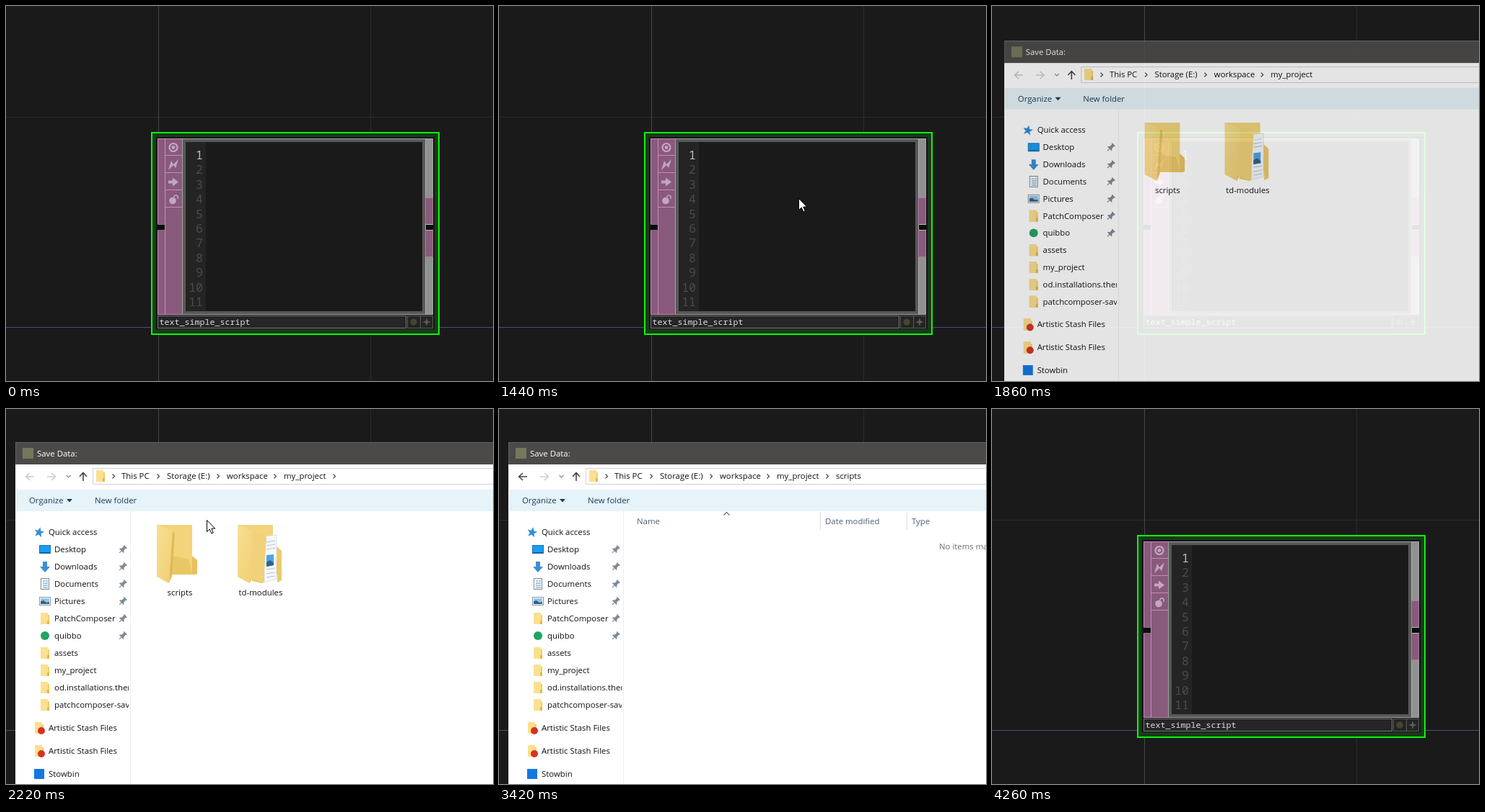
Recreate the animation shown at these times as an HTML page. Size 675 by 521 pixels, loop 5.28 s.

```html
<!DOCTYPE html>
<html lang="en">
<head>
<meta charset="utf-8">
<title>Save script</title>
<style>
html, body { margin: 0; width: 100%; height: 100%; overflow: hidden; background: #1a1a1a; }
svg { display: block; width: 675px; height: 521px; }
text { white-space: pre; }
.mono { font-family: "Noto Sans Mono", "DejaVu Sans Mono", monospace; }
.ui { font: 11.4px "Open Sans", "Noto Sans", sans-serif; fill: #111; }
.line { fill: none; stroke-width: 1; }
</style>
</head>
<body>
<svg id="stage" viewBox="0 0 675 521" xmlns="http://www.w3.org/2000/svg">
  <defs>
    <clipPath id="side"><rect x="13" y="142" width="157" height="400"/></clipPath>
    <linearGradient id="flap" x1="0" x2="1" y1="0" y2="1">
      <stop offset="0" stop-color="#f8df92"/><stop offset="1" stop-color="#f0cf74"/>
    </linearGradient>
    <g id="small">
      <path d="M-6-8H4V-5H6V8H-6Z" fill="#efcf6d"/>
      <path d="M-6-8H4V4L6 5V8H-6Z" fill="#fbe08f"/>
      <path d="M3 3H6V8H3Z" fill="#e2b84e"/>
    </g>
    <g id="pin" fill="#7d8a96" transform="rotate(45)">
      <path d="M-3-5.5H3V-4H2V0L4 2V3H-4V2L-2 0V-4H-3Z"/><path d="M-.6 3H.6V7H-.6Z"/>
    </g>
    <g id="big">
      <path d="M0 0H49V43L56 49V68L53 69H20Z" fill="#e6c25e"/>
      <path d="M0 0H49V68H24Z" fill="#f3d47b"/>
      <path d="M17 42L44 48L50 69H17Z" fill="#e9c765"/>
      <path d="M0 0L22 8L17 81L0 72Z" fill="url(#flap)"/>
      <path d="M22 8L17 81L21 71L25 12Z" fill="#dfba59"/>
    </g>
  </defs>

  <rect width="675" height="521" fill="#1a1a1a"/>
  <g class="line">
    <path d="M505.5 0V521M0 154.5H675" stroke="#2b2b2e"/>
    <path d="M211.5 0V521" stroke="#474747"/>
    <path d="M0 446.5H675" stroke="#4b4b82"/>
  </g>
  <g id="op"></g>
  <g id="menu"></g>
  <g id="dialog"></g>
  <path id="cursor" d="M.5.5V16.5L4.3 13L6.9 19L9.3 18L6.8 12.1H11.8Z" fill="#fff" stroke="#000" stroke-width="1"/>
</svg>
<script>
const LOOP = 5280, TICK = 60;
const $ = id => document.getElementById(id);
const rect = (x, y, w, h, fill, extra = "") =>
  `<rect x="${x}" y="${y}" width="${w}" height="${h}" fill="${fill}" ${extra}/>`;
const box = (x, y, w, h, fill, stroke) =>
  rect(x + .5, y + .5, w - 1, h - 1, fill, `stroke="${stroke}"`);
const path = (d, fill, extra = "") => `<path d="${d}" fill="${fill}" ${extra}/>`;
const stroke = (d, color, width = 1) =>
  path(d, "none", `stroke="${color}" stroke-width="${width}"`);
const label = (x, y, s, extra = "") => `<text class="ui" x="${x}" y="${y}" ${extra}>${s}</text>`;
const use = (id, x, y) => `<g transform="translate(${x} ${y})"><use href="#${id}"/></g>`;
const at = (x, y, body) => `<g transform="translate(${x} ${y})">${body}</g>`;

function operator() {
  const pink = "#cf86c0", plum = "#885a7c", icon = "#c6a5bf";
  let s = rect(202, 176, 398, 280, "#183a19", 'stroke="#0cf50c" stroke-width="2"');
  s += rect(208, 182, 386, 267, "#151515");
  s += box(210, 184, 11, 120, plum, pink) + box(210, 311, 11, 118, plum, pink);
  s += box(210, 303, 10, 9, "#111", "#777") + rect(210, 304, 10, 7, "#0c0c0c");
  s += box(220, 184, 25, 245, plum, pink);
  for (let y = 207; y < 290; y += 24) s += rect(221, y, 23, 1, pink);
  s += `<circle cx="232" cy="196.500" r="5.500" fill="none" stroke="${icon}" stroke-width="2.200"/>
    <circle cx="232" cy="196.500" r="2.400" fill="${icon}"/>`;
  s += path("M225 228L229 215L232 220L239 213L235 225L232 221Z", icon);
  s += path("M225 242.500H231V238.500L239 244.500L231 250.500V246.500H225Z", icon);
  s += `<circle cx="231" cy="270.500" r="4.800" fill="${icon}"/>`;
  s += stroke("M233 266V264.500Q235.500 261 238 264.500V268", icon, 1.6);
  s += box(244, 184, 338, 245, "#585858", "#a2a2a2");
  s += rect(249, 189, 328, 235, "#1a1a1a") + rect(249, 189, 28, 235, "#242424");
  for (let i = 0; i < 11; i++)
    s += `<text class="mono" x="273" y="${213 + i * 20.4}" text-anchor="end" font-size="16.500"
      fill="${i ? "#4b4b4b" : "#bdbdbd"}">${i + 1}</text>`;
  s += box(581, 184, 11, 245, "#919191", "#a8a8a8");
  s += box(581, 266, 11, 38, plum, "#b07aa4") + box(581, 311, 11, 38, plum, "#b07aa4");
  s += rect(582, 304, 10, 7, "#0c0c0c") + rect(582, 303, 10, 1, "#bbb") + rect(582, 311, 10, 1, "#bbb");
  s += box(210, 430, 345, 18, "#262628", "#777");
  s += box(556, 430, 19, 18, "#242424", "#5c5c5c") + box(574, 430, 18, 18, "#242424", "#5c5c5c");
  s += `<text class="mono" x="212.500" y="443" font-size="11.670" fill="#dedede">text_simple_script</text>
    <circle cx="565" cy="439" r="4.600" fill="#46462e"/>
    <path id="flag" fill="#5a5a5a"/>`;
  return s;
}

function menu() {
  const rows = ["Parameters...", "Info...", "Viewer Active", "View...", "Edit Contents...",
    "Run Script", "Save Contents...", "Reload Contents", "", "Rename", "Copy", "Paste", "Delete",
    "", "Bypass", "Lock", "Display", "", "Add Comment", "Help..."];
  let s = box(382, 150, 188, 371, "#3a3a3a", "#6a6a6a") + rect(383, 263, 186, 18, "#646464", 'id="pick"');
  rows.forEach((name, i) => {
    const y = 155 + i * 18;
    s += name ? label(394, y + 13, name, 'style="fill:#d6d6d6"') : rect(388, y + 9, 176, 1, "#5a5a5a");
  });
  return s;
}

const icons = {
  star: path("M0-7L2-2L7-2L3 1.500L4.500 6.500L0 3.500L-4.500 6.500L-3 1.500L-7-2L-2-2Z", "#2f8edb", 'transform="rotate(12)"'),
  desk: box(-8, -6, 16, 12, "#1a9df0", "#1474bd") + rect(-7, 4, 14, 1, "#0b5b99"),
  down: path("M-3-7H3V0H7L0 8L-7 0H-3Z", "#3d8ed8"),
  doc: box(-6, -8, 12, 16, "#fff", "#7d8b99") + stroke("M-3-4H0M-3-1H4M-3 2H4M-3 5H4M1-4H4", "#4a8cc0"),
  pic: box(-8, -6, 16, 12, "#fff", "#8b959e") + rect(-6, -4, 12, 8, "#8cc8ef") + path("M-6 4V0L-2-1L2 2L6 1V4Z", "#355f83"),
  folder: '<use href="#small"/>',
  dot: '<circle r="6" fill="#1fa463"/>',
  shared: '<use href="#small"/><circle cx="3" cy="4" r="5" fill="#d9301f"/>',
  tile: rect(-7, -7, 14, 14, "#1577e0")
};

function sidebar() {
  const rows = [
    [171, "star", "Quick access"], [195, "desk", "Desktop"], [219, "down", "Downloads"],
    [243, "doc", "Documents"], [267, "pic", "Pictures"], [291, "folder", "PatchComposer"],
    [315, "dot", "quibbo"], [339, "folder", "assets"], [363, "folder", "my_project"],
    [387, "folder", "od.installations.themes"], [411, "folder", "patchcomposer-saves"],
    [443, "shared", "Artistic Stash Files"], [475, "shared", "Artistic Stash Files"], [507, "tile", "Stowbin"]];
  return '<g clip-path="url(#side)">' + rows.map(([y, icon, name], i) => {
    const top = i === 0 || i > 10;
    return at(top ? 46 : 54, y, icons[icon]) + label(top ? 59 : 67, y + 4, name) +
      (i > 0 && i < 7 ? use("pin", 162, y) : "");
  }).join("") + "</g>";
}

const crumb = x => stroke(`M${x - 1.5} 90.500L${x + 1.5} 93.500L${x - 1.5} 96.500`, "#444", 1.2);
const arrow = (x, dir, color, id = "") =>
  `<path ${id} d="M${x - 6 * dir} 94H${x + 5 * dir}M${x} 89L${x + 5.5 * dir} 94L${x} 99"
    fill="none" stroke="${color}" stroke-width="1.500"/>`;

function dialog() {
  let s = rect(13, 46, 900, 650, "#fff") + rect(13, 46, 900, 31, "#4c4a48");
  s += rect(13, 46, 900, 1, "#63615f") + rect(13, 46, 1, 31, "#63615f");
  s += rect(23, 54, 15, 15, "#77775c", 'id="badge"') + label(43, 66, "Save Data:", 'id="title" style="fill:#fff"');
  s += arrow(33, -1, "#c9c9c9", 'id="back"') + arrow(63, 1, "#cfcfcf");
  s += stroke("M83.500 92L86.500 95L89.500 92", "#8a8a8a", 1.2);
  s += stroke("M107 100V89M102 94L107 88.500L112 94", "#444", 1.6);
  s += box(120, 82, 780, 23, "#fff", "#d2d2d2") + use("small", 131, 93);
  [[149, 160, "This PC"], [211, 223, "Storage (E:)"], [294, 306, "workspace"], [373, 385, "my_project"]]
    .forEach(([c, x, name]) => s += crumb(c) + label(x, 97, name));
  s += `<g id="tail">${crumb(455)}</g>`;
  s += rect(14, 112, 900, 30, "#e6f4f9");
  s += label(32, 131, "Organize", 'style="fill:#1e395b"') + path("M84 125H92L88 129.500Z", "#1e395b");
  s += label(123, 131, "New folder", 'style="fill:#1e395b"');
  s += rect(172, 142, 1, 500, "#efefef") + sidebar();
  s += '<g id="outer">' + rect(188, 149, 105, 116, "#e5f3ff", 'id="hover"') +
    use("big", 209, 161) + label(241, 259, "scripts", 'text-anchor="middle"') +
    use("big", 321, 161) + at(321, 161,
      path("M24 12L38 16V78L34 81L20 78Z", "#e9c968") +
      path("M37 16L54 14V75L37 80Z", "#f4f7fa", 'stroke="#cbd4dc" stroke-width=".6"') +
      stroke("M40 24L52 22M40 29L52 27M40 34L52 32M40 62L52 60M40 68L52 66M40 73L52 71", "#b4c3d0") +
      path("M40 42L50 41V56L40 58Z", "#4fa3df") + path("M40 52L45 49L50 53V56L40 58Z", "#2f6385") +
      path("M54 30L61 36V77L55 80Z", "#ecca69") +
      path("M12 4L40 17L36 81L16 73Z", "#f1d27a") + path("M0 0L22 8L17 81L0 72Z", "url(#flap)")) +
    label(353, 259, "td-modules", 'text-anchor="middle"') + "</g>";
  s += '<g id="inner">' + label(467, 97, "scripts") +
    rect(445, 143, 1, 25, "#dedede") + rect(565, 143, 1, 25, "#dedede") +
    stroke("M311.500 147.500L315.500 143.500L319.500 147.500", "#666", 1.2);
  [[191, "Name"], [452, "Date modified"], [572, "Type"]]
    .forEach(([x, name]) => s += label(x, 160, name, 'style="fill:#4c607a"'));
  return s + label(610, 195, "No items match your search.", 'style="fill:#6d6d6d"') + "</g>";
}

$("op").innerHTML = operator();
$("menu").innerHTML = menu();
$("dialog").innerHTML = dialog();

// Pointer journeys: time, x, y; each ends when it leaves the picture.
const trips = [
  { end: 1620, keys: [[180, 352, 147], [240, 371, 232], [300, 376, 272], [780, 376, 272], [1080, 415, 267]] },
  { end: 3420, keys: [[2160, 331, 126], [2220, 278, 154], [2280, 252, 190], [2340, 238, 212],
    [2460, 230, 221], [3060, 230, 221], [3120, 262, 243], [3180, 373, 314], [3240, 552, 400], [3300, 660, 425]] }
];

function pointer(t) {
  const trip = trips.find(p => t >= p.keys[0][0] && t < p.end);
  if (!trip) return null;
  const k = trip.keys, i = k.findIndex(p => p[0] > t);
  if (i < 0) return k[k.length - 1].slice(1);
  const [a, b] = [k[i - 1], k[i]], u = (t - a[0]) / (b[0] - a[0]);
  return [1, 2].map(n => a[n] + (b[n] - a[n]) * u);
}

const show = (id, on) => $(id).setAttribute("visibility", on ? "inherit" : "hidden");

// The window grows while fading in, and shrinks while fading out.
function windowState(t) {
  if (t < 1620 || t >= 4260) return [0, 0];
  if (t < 2100) {
    const rest = Math.exp(-(t - 1560) / 141);
    return [1 - rest, .062 * rest];
  }
  if (t < 4140) return [1, 0];
  const left = Math.exp(-(t - 4080) / 71);
  return [left, .047 * (1 - left)];
}

function draw(now) {
  const t = Math.floor(now % LOOP / TICK) * TICK;
  const [alpha, shrink] = windowState(t), closing = t >= 4140, opened = t >= 2940;
  const d = $("dialog");
  d.setAttribute("visibility", alpha ? "visible" : "hidden");
  d.setAttribute("opacity", alpha);
  d.setAttribute("transform", `translate(556 370) scale(${1 - shrink}) translate(-556 -370)`);
  show("badge", !closing);
  $("title").setAttribute("x", closing ? 21 : 43);
  show("tail", t >= 1920);
  show("outer", !opened);
  show("inner", opened);
  $("back").setAttribute("stroke", opened ? "#444" : "#c9c9c9");
  show("hover", !opened && t >= 2340);
  $("hover").setAttribute("fill", t >= 2760 ? "#cce8ff" : "#e5f3ff");

  $("menu").setAttribute("visibility", t >= 660 && t < 1440 ? "visible" : "hidden");
  show("pick", t >= 900);
  $("pick").setAttribute("fill", t >= 1260 ? "#7c7c7c" : "#606060");
  $("flag").setAttribute("d", closing && t < 4200
    ? "M583 433L589 439H585V445H581V439H577Z"
    : "M583 433L584.500 437.500L589 439L584.500 440.500L583 445L581.500 440.500L577 439L581.500 437.500Z");

  const p = pointer(t), c = $("cursor");
  c.setAttribute("visibility", p ? "visible" : "hidden");
  if (p) c.setAttribute("transform", `translate(${p.map(Math.round).join(" ")})`);
}

const start = performance.now();
function loop() {
  draw(performance.now() - start);
  requestAnimationFrame(loop);
}
loop();
</script>
</body>
</html>
```
